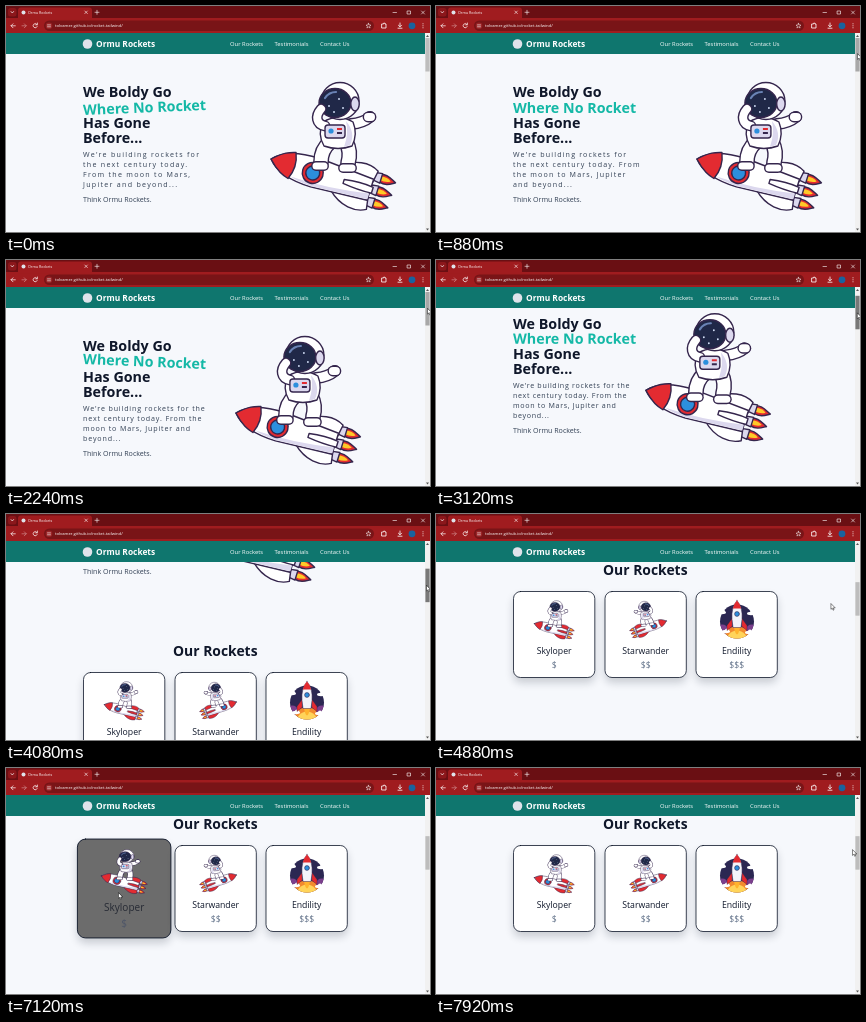
These frames come from a looping animation (424 by 226 pixels, 8000 ms). An HTML page with a canvas:

```html
<!DOCTYPE html>
<html lang="en">
<head>
<meta charset="utf-8">
<title>Rockets</title>
<style>
  html, body { margin: 0; width: 100%; height: 100%; overflow: hidden; background: #f6f8fc; }
  canvas { display: block; width: 424px; height: 226px; }
</style>
</head>
<body>
<canvas id="stage"></canvas>
<script>
const W = 424, H = 226, LOOP = 8000, STEP = 80;
const canvas = document.getElementById('stage');
const c = canvas.getContext('2d');
const dpr = window.devicePixelRatio || 1;
canvas.width = W * dpr;
canvas.height = H * dpr;

const FONT = '"Open Sans", "Noto Sans", sans-serif';
const INK = '#0f172a', LINE = '#35264d', RED = '#e32b31', PALE = '#dcd8ee';
const BRAND = 'Ormu Rockets';

// Time in seconds, then values
const SCROLL = [[2.9, 0], [3.5, 62], [4.08, 136], [4.4, 176], [4.75, 217]];
const TRACKING = [[0, 1.28], [0.88, 1.16], [2.24, 0.86], [4, 0.5]];
const POINTER = [
  [0, 430, 8], [0.6, 422, 40], [0.88, 421.5, 48], [2.9, 421.5, 49],
  [4.08, 420.5, 71.6], [4.75, 420.5, 85], [5.2, 332, 102], [5.92, 321, 101],
  [6.1, 315, 103], [6.75, 118, 122], [7.12, 112.5, 125], [7.2, 112.5, 125],
  [7.8, 415, 84], [7.92, 416.5, 82]
];
const CARDS = [
  { x: 77.5, name: 'Skyloper', price: '$', art: explorerArt },
  { x: 169, name: 'Starwander', price: '$$', art: adventurerArt },
  { x: 260, name: 'Endility', price: '$$$', art: skyArt }
];
const CARD_Y = 294.5, CARD_W = 81.3, CARD_H = 86;

const clamp = (v, a, b) => Math.min(b, Math.max(a, v));
const mix = (a, b, k) => a + (b - a) * k;
const ease = k => k * k * (3 - 2 * k);

function track(keys, t) {
  if (t <= keys[0][0]) return keys[0].slice(1);
  for (let i = 1; i < keys.length; i++) {
    const a = keys[i - 1], b = keys[i];
    if (t <= b[0]) {
      const k = (t - a[0]) / (b[0] - a[0]);
      return a.slice(1).map((v, j) => mix(v, b[j + 1], k));
    }
  }
  return keys[keys.length - 1].slice(1);
}

function blend(a, b, k) {
  return `rgb(${a.map((v, i) => Math.round(mix(v, b[i], k)))})`;
}

function text(s, x, y, size, color, weight = 400, align = 'left', spacing = 0) {
  c.font = `${weight} ${size}px ${FONT}`;
  c.letterSpacing = spacing + 'px';
  c.textAlign = align;
  c.fillStyle = color;
  c.fillText(s, x, y);
}

function rect(x, y, w, h, color, r = 0) {
  c.fillStyle = color;
  c.beginPath();
  c.roundRect(x, y, w, h, r);
  c.fill();
}

function shape(d, fill, stroke = LINE, width = 1.4) {
  const p = new Path2D(d);
  if (fill) { c.fillStyle = fill; c.fill(p); }
  if (stroke) { c.strokeStyle = stroke; c.lineWidth = width; c.stroke(p); }
}

function oval(x, y, rx, ry, fill, stroke, width = 1.4) {
  c.beginPath();
  c.ellipse(x, y, rx, ry, 0, 0, Math.PI * 2);
  if (fill) { c.fillStyle = fill; c.fill(); }
  if (stroke) { c.strokeStyle = stroke; c.lineWidth = width; c.stroke(); }
}

function limb(d, width) {
  c.lineCap = c.lineJoin = 'round';
  shape(d, null, LINE, width + 2.8);
  shape(d, null, '#fff', width);
}

function at(x, y, draw, sx = 1, sy = sx, angle = 0) {
  c.save();
  c.translate(x, y);
  c.rotate(angle);
  c.scale(sx, sy);
  draw();
  c.restore();
}

function flame(y) {
  shape(`M110 ${y - 4} C117 ${y - 6} 121 ${y - 2} 126 ${y} C121 ${y + 3} 117 ${y + 6} 110 ${y + 4} Z`, RED);
  shape(`M110 ${y - 2} Q117 ${y - 3} 121 ${y} Q117 ${y + 3} 110 ${y + 2} Z`, '#ffc928', null);
  shape(`M104 ${y - 4} L111 ${y - 5} V${y + 5} L104 ${y + 4} Z`, PALE);
}

function rocket(fin) {
  [-14, 12, -1].forEach(flame);
  shape('M66 -12 C80 -25 96 -26 106 -20 L104 -8 Z', fin);
  shape('M66 12 C80 25 96 26 106 20 L104 8 Z', fin);
  shape('M0 0 C10 -12 28 -15 46 -15 L104 -11 V11 L46 15 C28 15 10 12 0 0 Z', '#fff');
  shape('M24 11 Q62 12 104 4 V10 L46 14 Q32 14 24 11 Z', PALE, null);
  shape('M0 0 C10 -10 16 -12 22 -13.6 Q28 0 22 13.6 C16 12 10 10 0 0 Z', RED);
  shape('M76 -2 Q92 -5 106 -3 V3 Q92 4 76 2 Z', fin);
  oval(44, 1, 10.5, 10.5, RED, LINE);
  oval(44, 1, 7, 7, '#2c8fdd', LINE);
}

function rider(fin = '#fff') {
  at(0, 77, () => rocket(fin), 1, 1, 0.3);
  limb('M59 60 C52 66 50 72 50 80', 13);
  limb('M75 60 C79 67 79 74 77 81', 13);
  limb('M45 84 H53', 7);
  limb('M72 86 H81', 7);
  limb('M80 42 Q92 41 99 35', 9);
  limb('M97 35 H100', 8);
  shape('M52 40 Q67 31 82 40 Q87 52 81 64 Q67 69 53 64 Q46 52 52 40 Z', '#fff');
  shape('M75 39 Q85 51 79 63 L73 65 Q78 51 75 39 Z', PALE, null);
  oval(69, 19, 19, 18.5, '#fff', LINE);
  oval(64, 21, 16, 14.5, '#202848', LINE);
  shape('M54 16 Q58 10 65 10', null, '#6a83b5', 2.2);
  for (const [x, y] of [[58, 24], [68, 17], [72, 26], [63, 30]]) oval(x, y, 0.9, 0.9, '#dbe7ff');
  oval(84, 22, 4.2, 7, PALE, LINE);
  limb('M54 44 C45 42 44 34 50 27', 8);
  c.beginPath();
  c.roundRect(54, 43, 20, 13, 3);
  c.fillStyle = PALE;
  c.fill();
  c.strokeStyle = LINE;
  c.lineWidth = 1.4;
  c.stroke();
  oval(60, 49, 2.6, 2.6, '#2c8fdd');
  rect(66, 46, 5, 2, RED);
  rect(66, 50, 5, 2, LINE);
}

function explorerArt() {
  at(21, 9, () => rider(RED), 0.32, 0.3);
}

function adventurerArt() {
  at(59.5, 8, () => rider(RED), -0.3, 0.28, -0.08);
}

function skyArt() {
  oval(41, 30, 17, 17, '#2b2752');
  c.save();
  c.beginPath();
  c.arc(41, 30, 17, 0, Math.PI * 2);
  c.clip();
  oval(41, 49, 17, 14, '#f28a2e');
  oval(41, 51, 11, 12, '#ffd45a');
  oval(26, 38, 6, 5, '#7b3f8c');
  oval(56, 38, 6, 5, '#7b3f8c');
  c.restore();
  for (const [x, y] of [[26, 21], [55, 22], [30, 40], [53, 41]]) {
    oval(x, y, 4, 1.7, '#fff');
    oval(x + 1, y - 1.2, 2, 1.8, '#fff');
  }
  shape('M36 27 L31 34 V39 L36 35 Z M46 27 L51 34 V39 L46 35 Z', RED, LINE, 0.4);
  shape('M38 36 Q41 50 44 36 Z', '#ffb32c', null);
  shape('M41 9 Q47 16 46 28 L45 36 H37 L36 28 Q35 16 41 9 Z', '#f4f4fa', LINE, 0.5);
  shape('M41 9 Q44 12 45.2 17 H36.8 Q38 12 41 9 Z', RED, null);
  oval(41, 22.5, 2.4, 2.4, '#2c8fdd', LINE, 0.6);
}

function paragraph(spacing) {
  const lines = spacing > 1.22
    ? ["We're building rockets for", 'the next century today.', 'From the moon to Mars,', 'Jupiter and beyond...']
    : spacing > 1.07
      ? ["We're building rockets for", 'the next century today. From', 'the moon to Mars, Jupiter', 'and beyond...']
      : ["We're building rockets for the", 'next century today. From the', 'moon to Mars, Jupiter and', 'beyond...'];
  lines.forEach((s, i) => text(s, 77, 150.7 + i * 10, 7.1, '#334155', 400, 'left', spacing));
}

function hero(t) {
  const big = 14.3;
  text('We Boldy Go', 77, 91.4, big, INK, 700);
  const tilt = 2.5 * Math.sin((t - 0.88) * Math.PI * 2 / 4.5) * Math.PI / 180;
  at(139, 101.5, () => text('Where No Rocket', -62, 5, big, '#14b8a6', 700), 1, 1, tilt);
  text('Has Gone', 77, 121.8, big, INK, 700);
  text('Before...', 77, 136.9, big, INK, 700);
  paragraph(track(TRACKING, t)[0]);
  text(`Think ${BRAND}.`, 77, 195.8, 7.1, '#334155');
  at(273 - 22.8 * Math.abs(t - 0.35), 76, () => rider());
}

// Hover level builds up and fades with a 300 ms transition
function hoverLevel(card, t) {
  let level = 0;
  for (let s = 4.48; s <= t + 0.001; s += 0.08) {
    const [x, y] = track(POINTER, s);
    const over = track(SCROLL, s)[0] > 200 && x > card.x && x < card.x + CARD_W && y > 77 && y < 164;
    level = clamp(level + (over ? 0.27 : -0.27), 0, 1);
  }
  return ease(level);
}

function drawCard(card, t) {
  const k = hoverLevel(card, t);
  const mid = CARD_W / 2;
  at(card.x + mid, CARD_Y + CARD_H / 2, () => {
    c.translate(-mid, -CARD_H / 2);
    c.save();
    c.shadowColor = 'rgba(15,23,42,0.2)';
    c.shadowBlur = 9 * dpr;
    c.shadowOffsetY = 5 * dpr;
    rect(0, 0, CARD_W, CARD_H, blend([255, 255, 255], [108, 108, 108], k), 7);
    c.restore();
    c.beginPath();
    c.roundRect(0, 0, CARD_W, CARD_H, 7);
    c.strokeStyle = INK;
    c.lineWidth = 0.8;
    c.stroke();
    card.art();
    text(card.name, mid, 62.7, 8.7, blend([15, 23, 42], [38, 42, 52], k), 400, 'center');
    text(card.price, mid, 76.3, 8.7, blend([100, 116, 139], [78, 86, 104], k), 400, 'center');
  }, 1 + 0.15 * k);
}

function header() {
  rect(0, 27, 419, 21, '#0f766e');
  oval(81.5, 38, 4.8, 4.8, '#dfe3ea');
  text(BRAND, 90, 41.2, 8.4, '#fff', 700);
  text('Our Rockets', 224, 40.3, 5.85, '#fff');
  text('Testimonials', 268.5, 40.3, 5.85, '#fff');
  text('Contact Us', 314, 40.3, 5.85, '#fff');
}

function scrollbar(t, scroll) {
  rect(419, 27, 5, 199, '#f1f1f1');
  const drag = t > 2.8 && t < 4.8;
  const over = t > 0.7 && t <= 2.8;
  rect(419.4, 32 + scroll / 6, 4.2, 33.5, drag ? '#787878' : over ? '#a8a8a8' : '#bdbdbd');
  shape('M420 31 L421.5 29 L423 31 Z', '#555', null);
  shape('M420 222.5 L421.5 224.5 L423 222.5 Z', '#555', null);
}

function browser() {
  const icon = (d, w = 0.7) => shape(d, null, '#fff', w);
  rect(0, 0, W, 13, '#6a0f13');
  rect(0, 12, W, 15, '#a01c1f');
  rect(2, 2, 8.5, 8.5, '#8c171b', 2.5);
  icon('M5 5.5 L6.3 7 L7.6 5.5');
  rect(12, 1.5, 74, 12, '#a01c1f', [3, 3, 0, 0]);
  oval(17.5, 6.5, 2, 2, '#dfe3ea');
  text(BRAND, 22, 8, 3.7, '#fff');
  icon('M78.8 5 L81.4 7.6 M81.4 5 L78.8 7.6', 0.6);
  icon('M89 6.3 H93 M91 4.3 V8.3', 0.6);
  icon('M387 6.5 H390.5 M401.5 5 H404.5 V8 H401.5 Z M415.5 5 L418.5 8 M418.5 5 L415.5 8', 0.6);
  rect(38, 14.5, 330, 10.5, '#791417', 5.2);
  icon('M9.3 19.8 H5 L7 17.8 M5 19.8 L7 21.8');
  shape('M16 19.8 H20.3 L18.3 17.8 M20.3 19.8 L18.3 21.8', null, '#d08a8c', 0.7);
  icon('M31 18.5 A2.1 2.1 0 1 0 31.2 20.5 M31.4 17 V18.8 H29.6');
  oval(43, 19.8, 3.3, 3.3, '#9a2427');
  icon('M41.5 18.9 H44.5 M41.5 20.8 H44.5', 0.6);
  text('tolvamer.github.io/rocket-tailwind/', 49, 21.3, 4.2, '#fff');
  icon('M362.5 17.3 L363.2 19 L365 19.1 L363.6 20.3 L364.1 22 L362.5 21 L360.9 22 L361.4 20.3 L360 19.1 L361.8 19 Z', 0.5);
  icon('M376 18 H377.6 V17.2 H379 V18 H380 V22 H376 Z', 0.8);
  icon('M394 17 V20.5 M392.4 19.2 L394 20.8 L395.6 19.2 M392 22.2 H396', 0.8);
  oval(406, 19.8, 3.4, 3.4, '#19639f');
  for (const y of [17.8, 19.8, 21.8]) oval(417, y, 0.5, 0.5, '#fff');
}

function pointer(t) {
  const [x, y] = track(POINTER, t);
  at(x, y, () => shape('M0 0 V5.4 L1.3 4.3 L2.2 6.3 L3.1 5.9 L2.2 4 H3.9 Z', '#fff', '#111', 0.5));
}

function draw(t) {
  const scroll = track(SCROLL, t)[0];
  c.setTransform(dpr, 0, 0, dpr, 0, 0);
  c.lineCap = c.lineJoin = 'round';
  rect(0, 0, W, H, '#f6f8fc');
  c.save();
  c.translate(0, -scroll);
  hero(t);
  text('Our Rockets', 209.3, 277.8, 13.9, INK, 700, 'center');
  CARDS.forEach(card => drawCard(card, t));
  c.restore();
  header();
  scrollbar(t, scroll);
  browser();
  pointer(t);
}

const start = performance.now();
function frame() {
  const ms = (performance.now() - start) % LOOP;
  draw(Math.floor(ms / STEP) * STEP / 1000);
  requestAnimationFrame(frame);
}
frame();
</script>
</body>
</html>
```
